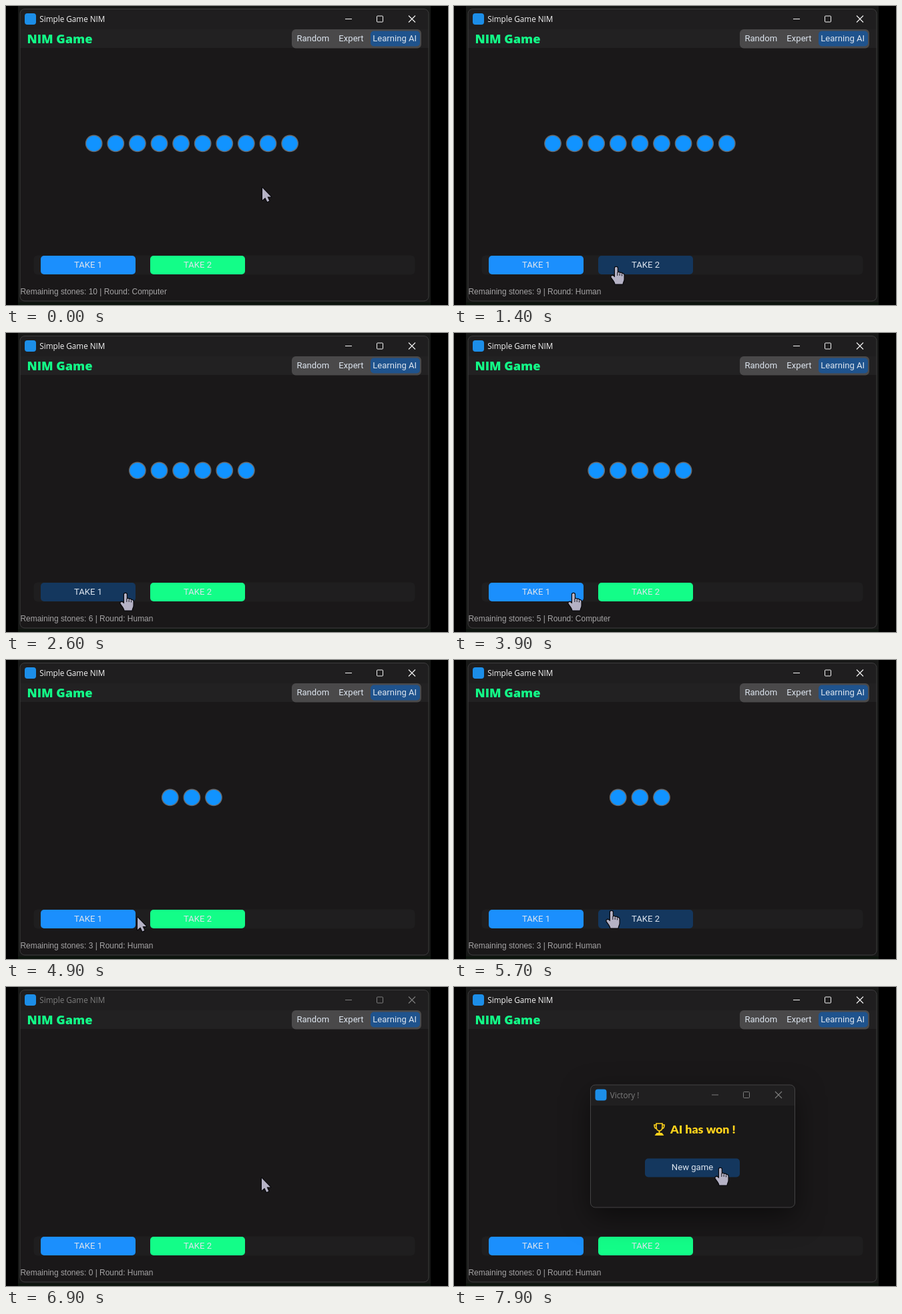
Animation, 662 px wide and 449 px high, one loop 8 s. Source, as an HTML page with a canvas:

```html
<!DOCTYPE html>
<html lang="en">
<head>
<meta charset="utf-8">
<title>NIM Game</title>
<style>
html, body { margin: 0; width: 100%; height: 100%; overflow: hidden; background: #000; }
canvas { display: block; width: 662px; height: 449px; }
</style>
</head>
<body>
<canvas id="stage" width="662" height="449"></canvas>
<script>
const ctx = document.getElementById('stage').getContext('2d');
const LOOP = 8000;
const BLUE = '#1b8ffd', GREEN = '#13fd88', HOVER = '#14375e', TEXT = '#dce4ee';
const UI = '13.1px Roboto, sans-serif';
const CAPTION = '11.7px "Open Sans", sans-serif';

// time, stones left, whose turn
const MOVES = [
  [0, 10, 'Computer'], [500, 9, 'Human'], [1900, 7, 'Computer'], [2500, 6, 'Human'],
  [3500, 5, 'Computer'], [4300, 3, 'Human'], [6000, 1, 'Computer'], [6600, 0, 'Human']
];
// start, end, target x, target y
const PATH = [
  [0, 0, 384, 273], [800, 1300, 243, 392], [1950, 2400, 179, 391],
  [4600, 5400, 236, 377], [6050, 6600, 383, 287], [7200, 7800, 399, 272]
];
// a pressed button stays unlit until the pointer leaves it
const PRESSED = [[1900, 2250], [3500, 4900], [6000, 6500]];
const DIALOG_AT = 7000, BLUR_AT = 6800, FOCUS_AT = 7500;

const take1 = { x: 52, y: 375, w: 142, h: 28, label: 'TAKE 1', fill: BLUE };
const take2 = { x: 216, y: 375, w: 142, h: 28, label: 'TAKE 2', fill: GREEN };
const again = { x: 286, y: 257.5, w: 142, h: 28, label: 'New game', fill: BLUE };

function box(x, y, w, h, r, fill, stroke) {
  ctx.beginPath();
  ctx.roundRect(x, y, w, h, r);
  if (fill) { ctx.fillStyle = fill; ctx.fill(); }
  if (stroke) { ctx.strokeStyle = stroke; ctx.lineWidth = 1; ctx.stroke(); }
}

function text(str, x, y, font, color, align = 'left') {
  ctx.font = font;
  ctx.fillStyle = color;
  ctx.textAlign = align;
  ctx.fillText(str, x, y);
}

function lines(color, width, ...runs) {
  ctx.strokeStyle = color;
  ctx.lineWidth = width;
  ctx.beginPath();
  for (const [x1, y1, x2, y2] of runs) {
    ctx.moveTo(x1, y1);
    ctx.lineTo(x2, y2);
  }
  ctx.stroke();
}

function pointerAt(t) {
  let [, , x, y] = PATH[0];
  for (const [start, end, tx, ty] of PATH.slice(1)) {
    if (t < start) break;
    const p = Math.min(1, (t - start) / (end - start));
    const e = p * p * (3 - 2 * p);
    x += (tx - x) * e;
    y += (ty - y) * e;
  }
  return { x, y };
}

const inside = (p, b) => p.x >= b.x && p.x <= b.x + b.w && p.y >= b.y && p.y <= b.y + b.h;

function button(b, lit) {
  box(b.x, b.y, b.w, b.h, 5, lit ? HOVER : b.fill);
  text(b.label, b.x + b.w / 2, b.y + 17.7, UI, TEXT, 'center');
}

function titleBar(x, y, title, right, active) {
  const color = active ? '#f4f4f4' : '#7d7d7d';
  box(x, y - 8.5, 17, 17, 4, '#1c8ee8');
  text(title, x + 22.3, y + 4.5, CAPTION, color);
  lines(color, 1.1, [right - 105, y, right - 95, y],
    [right - 10, y - 5, right, y + 5], [right, y - 5, right - 10, y + 5]);
  box(right - 57.5, y - 4.5, 9, 9, 1, null, color);
}

function mainWindow(t, lit) {
  ctx.fillStyle = '#000';
  ctx.fillRect(0, 0, 662, 449);
  ctx.fillStyle = '#171817';
  ctx.fillRect(18, 0, 618, 449);
  ctx.fillStyle = '#0d150e';
  ctx.fillRect(18, 445, 618, 4);
  box(21, 4.5, 612, 438.5, 7, '#1a1819');
  box(21, 4.5, 612, 31, [7, 7, 0, 0], '#1f1e1f');
  ctx.fillStyle = '#222122';
  ctx.fillRect(21, 35, 612, 28);
  box(21, 4.5, 612, 438.5, 7, null, '#3d3c3d');
  titleBar(28, 19.5, 'Simple Game NIM', 613, t < BLUR_AT || t >= FOCUS_AT);

  text('NIM Game', 31.5, 56, '800 18.2px "Open Sans", sans-serif', GREEN);
  box(428, 35, 194, 28.5, 6, '#4a494a');
  box(546, 37.5, 74, 23, 5, '#1f538d');
  text('Random', 459.8, 53, UI, TEXT, 'center');
  text('Expert', 517, 53, UI, TEXT, 'center');
  text('Learning AI', 582.2, 53, UI, TEXT, 'center');

  const [, left, turn] = MOVES.filter(m => m[0] <= t).pop();
  for (let i = 0; i < left; i++) {
    ctx.beginPath();
    ctx.arc(278.4 + (i - (left - 1) / 2) * 32.6, 206.4, 12.2, 0, Math.PI * 2);
    ctx.fillStyle = '#1193ff';
    ctx.fill();
    ctx.strokeStyle = '#69696b';
    ctx.lineWidth = 1.4;
    ctx.stroke();
  }

  box(41.5, 374.5, 571, 29, 6, '#1f1e1f');
  button(take1, lit === take1);
  button(take2, lit === take2);
  text(`Remaining stones: ${left} | Round: ${turn}`, 21.5, 432.7,
    '11.95px "Liberation Sans", Arial, sans-serif', '#a5a4a5');
}

function trophy(x, y) {
  ctx.save();
  ctx.translate(x, y);
  ctx.strokeStyle = ctx.fillStyle = '#ffd21c';
  ctx.lineWidth = 1.6;
  ctx.stroke(new Path2D('M4 1H13V6C13 10 11 12 8.500 12C6 12 4 10 4 6Z M4 3H1C1 7 2.500 9 5 9 M13 3H16C16 7 14.500 9 12 9'));
  ctx.fill(new Path2D('M7.500 12H9.500V15H12.500L15.500 19H1.500L4.500 15H7.500Z'));
  ctx.restore();
}

function dialog(t, lit) {
  ctx.save();
  ctx.shadowColor = 'rgba(0,0,0,.5)';
  ctx.shadowBlur = 42;
  ctx.shadowOffsetY = 14;
  box(204.5, 147, 306, 184, 7, '#191819');
  ctx.restore();
  box(204.5, 147, 306, 31, [7, 7, 0, 0], '#201f20');
  box(204.5, 147, 306, 184, 7, null, '#444344');
  titleBar(211.5, 162, 'Victory !', 491, t < FOCUS_AT);
  trophy(299, 204);
  text('AI has won !', 324, 219.5, '900 17.8px Lato, sans-serif', '#ffd21c');
  button(again, lit === again);
}

const ARROW = new Path2D('M0 0V18.500L4.300 14.800L7.300 21L10.300 19.500L7.500 13.500H13Z');
const HAND = new Path2D('M-2 1.500C-2 -.5 1.800 -.5 1.800 1.500V9C2.500 7.500 5 7.800 5.200 9.300C6 8.200 8.300 8.700 8.500 10.200C9.500 9.400 11.500 10.200 11.500 12V18C11.500 21 10 22 9.500 25.500H-1.500C-2 22 -5 19 -7.300 15.500C-8.300 13.500 -6 12 -4.300 13.500L-2 15.500Z');

function drawPointer(p, hand) {
  ctx.save();
  ctx.translate(p.x, p.y);
  ctx.lineJoin = 'round';
  ctx.strokeStyle = '#08080c';
  ctx.lineWidth = 2.4;
  ctx.stroke(hand ? HAND : ARROW);
  ctx.fillStyle = '#b5b2c5';
  ctx.fill(hand ? HAND : ARROW);
  if (hand) lines('#14141c', 1, [1.8, 8, 1.8, 13], [5.2, 9.5, 5.2, 13], [8.5, 10.5, 8.5, 13.5]);
  ctx.restore();
}

function draw(t) {
  const open = t >= DIALOG_AT;
  const pointer = pointerAt(t);
  const over = (open ? [again] : [take1, take2]).find(b => inside(pointer, b));
  const lit = PRESSED.some(([a, b]) => t >= a && t < b) ? null : over;
  mainWindow(t, lit);
  if (open) dialog(t, lit);
  drawPointer(pointer, !!over);
}

const began = performance.now();
function tick() {
  const t = (performance.now() - began) % LOOP;
  draw(Math.floor(t / 100) * 100);
  requestAnimationFrame(tick);
}
tick();
</script>
</body>
</html>
```
